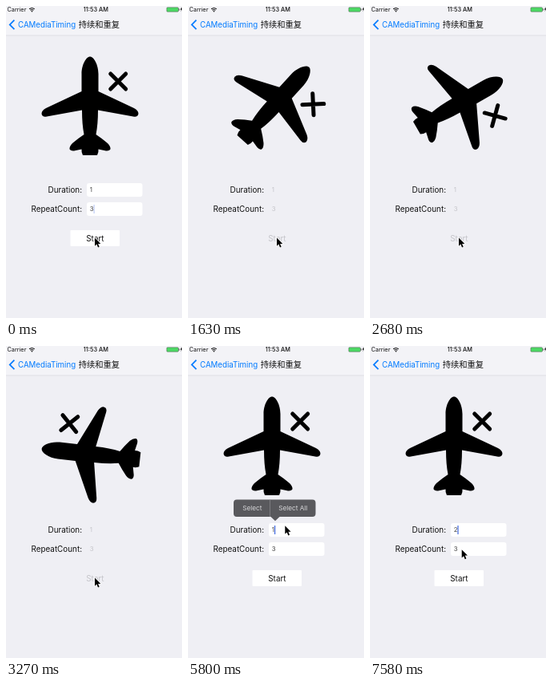
Animation, 220 px wide and 391 px high, one loop 8000 ms. Source, as an HTML page:

```html
<!DOCTYPE html>
<html lang="zh">
<head>
<meta charset="utf-8">
<style>
  html, body { margin: 0; width: 100%; height: 100%; overflow: hidden; background: #efeff4; }
  svg { display: block; width: 100%; height: 100%; }
  text { font: 9.9px Inter, "Open Sans", sans-serif; fill: #111; }
  .status { font-size: 7.3px; }
  .clock { font-weight: 500; }
  .back { font-size: 9.7px; fill: #007aff; }
  .title { font: 500 10.3px "Noto Sans CJK SC", "Noto Sans CJK", sans-serif; }
  .value { font-size: 7.8px; fill: #444; }
  .menu { font-size: 8.2px; fill: #d8d8da; }
  .box { fill: #fff; }
  .end { text-anchor: end; }
  .mid { text-anchor: middle; }
  .busy .box { fill: none; }
  .busy text { fill: #c4c4c9; }
</style>
</head>
<body>
<svg viewBox="0 0 220 391">
  <rect width="220" height="391" fill="#efeff4"/>
  <rect width="220" height="37" fill="#f3f3f7"/>
  <rect y="36.600" width="220" height=".7" fill="#d6d6db"/>

  <text class="status" x="1.500" y="7.400">Carrier</text>
  <g fill="none" stroke="#000">
    <path d="M29 3.700q3.400-2.600 6.800 0M30.300 5.200q2.100-1.600 4.200 0"/>
    <circle cx="32.400" cy="6.600" r=".5"/>
  </g>
  <text class="status clock mid" x="112.300" y="7.400">11:53 AM</text>
  <rect x="200.900" y="1.800" width="14.600" height="5.400" rx="1" fill="#4cd964" stroke="#555" stroke-width=".5"/>
  <path d="M216.300 3.400v2.200" stroke="#555"/>
  <path d="M219.400 1.500l-1.600 3.200h1.200l-.5 2.600 1.500-3.200" fill="#222"/>

  <path d="M10.400 17.600l-5.700 5.800 5.700 5.800" fill="none" stroke="#007aff" stroke-width="1.700"/>
  <text class="back" x="15" y="26.800">CAMediaTiming</text>
  <text class="title" x="90.700" y="27">持续和重复</text>

  <g id="plane">
    <path d="M105 63.500C110 63.500 115.500 74 115.500 85V107L160 128Q165.500 131 165.500 135Q165 139.500 159 138.500L115 130.500
      Q115 148 112.500 161Q120 166 127 172Q131 176 130.500 179.500Q129 182 125 181.500L115.500 179.500Q116 183 114 187
      H96Q94 183 94.500 179.500L85 181.500Q81 182 79.500 179.500Q79 176 83 172Q90 166 97.500 161Q95 148 95 130.500
      L51 138.500Q45 139.500 44.500 135Q44.500 131 50 128L94.500 107V85C94.500 74 100 63.500 105 63.500Z"/>
    <path d="M130.700 85l19 19m0-19l-19 19" stroke="#000" stroke-width="5" stroke-linecap="round"/>
  </g>

  <text class="end" x="95" y="233.700">Duration:</text>
  <text class="end" x="95" y="257.800">RepeatCount:</text>
  <g id="form">
    <rect class="box" x="101" y="222" width="69.500" height="17" rx="3"/>
    <rect class="box" x="101" y="246" width="69.500" height="17" rx="3"/>
    <rect class="box" x="80.500" y="281" width="61.500" height="20" rx="1"/>
    <text class="value" id="duration" x="104.700" y="233.300"></text>
    <text class="value" x="104.700" y="257.300">3</text>
    <text class="mid" x="111.400" y="294.800">Start</text>
  </g>
  <rect id="caret" width="1.200" height="11" fill="#4169e1"/>

  <g id="menu">
    <path d="M61 192.500H155.500q4 0 4 4V210q0 4-4 4H114.500L109 219.300 103.500 214H61q-4 0-4-4V196.500q0-4 4-4Z" fill="#59595d"/>
    <path d="M102.500 192.500v21.500" stroke="#8b8b90" stroke-width=".7"/>
    <text class="menu mid" x="80.300" y="206.300">Select</text>
    <text class="menu mid" x="131.300" y="206.300">Select All</text>
  </g>

  <path id="pointer" d="M0 0V10.300L2.400 8.100 4 12.100 5.700 11.400 4.100 7.400H7.300Z" stroke="#fff" stroke-width="1.200" paint-order="stroke"/>
</svg>
<script>
  const $ = id => document.getElementById(id);
  const LOOP = 8000, STEP = 148.6;           // the picture advances in fixed steps
  const SPIN_START = 3.55, SPIN_TURNS = 3;   // in steps
  const TURN = 1000 / 150;                   // steps per turn
  const clamp = (v, low, high) => Math.min(high, Math.max(low, v));
  const mix = (a, b, p) => a + (b - a) * p;
  const ease = (step, from, to) => {
    const p = clamp((step - from) / (to - from), 0, 1);
    return p * p * (3 - 2 * p);
  };

  function caretAlpha(step) {
    if (step < 1) return .35;
    if (step < 34) return 0;
    if (step === 36) return .4;
    if (step === 37 || step === 38) return 0;
    if (step === 48 || step === 49) return 0;
    return 1;
  }

  function draw(time) {
    const step = Math.floor((time + 5) / STEP);

    const turns = clamp((step - SPIN_START) / TURN, 0, SPIN_TURNS);
    $("plane").setAttribute("transform", `rotate(${turns * 360} 111.200 129.800)`);
    $("form").setAttribute("class", step >= 4 && step < 24 ? "busy" : "");

    const value = step < 41 ? "1" : step < 43 ? "" : "2";
    const editing = step >= 34;
    $("duration").textContent = value;
    $("caret").setAttribute("x", !editing ? 109.5 : { 1: 108, 2: 109.4 }[value] || 104.7);
    $("caret").setAttribute("y", editing ? 225 : 249);
    $("caret").setAttribute("opacity", caretAlpha(step));
    $("menu").setAttribute("visibility", step >= 39 && step < 41 ? "visible" : "hidden");

    const up = ease(step, 25, 30), down = ease(step, 46, 51);
    const x = mix(mix(111, 121.3, up), 114.7, down);
    const y = mix(mix(290.5, 225.3, up), 255.2, down);
    $("pointer").setAttribute("transform", `translate(${x} ${y})`);
  }

  function tick() {
    draw(performance.now() % LOOP);
    requestAnimationFrame(tick);
  }
  tick();
</script>
</body>
</html>
```
